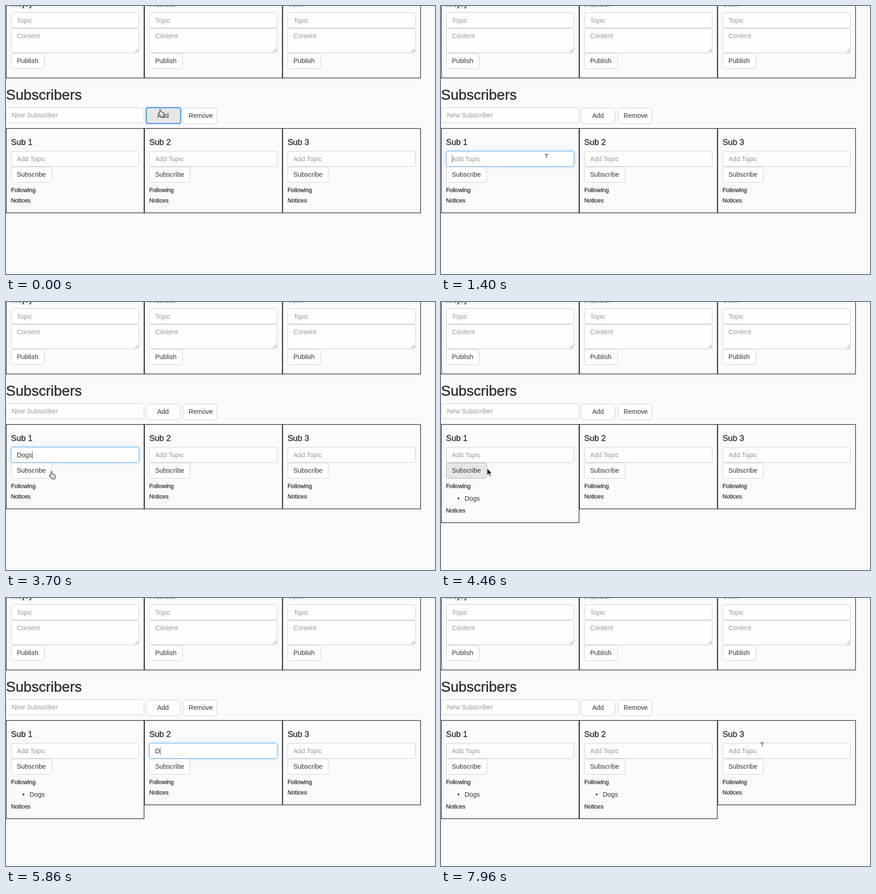
These frames come from a looping animation (947 px wide and 592 px high, 8000 ms). An HTML page:

```html
<!DOCTYPE html>
<html lang="en">
<head>
<meta charset="utf-8">
<title>Publishers and subscribers</title>
<style>
  html, body { margin: 0; width: 100%; height: 100%; overflow: hidden; background: #fafafc; }
  svg { display: block; font: 14.4px "Liberation Sans", Arial, sans-serif; }
  text { fill: #333; white-space: pre; }
  .hint { fill: #999; }
  .h2 { font-size: 31.7px; stroke: #333; stroke-width: .6px; }
  .h4 { font-size: 18.3px; stroke: #333; stroke-width: .45px; }
  .h6 { font-size: 12.8px; stroke: #333; stroke-width: .35px; }
  .box { fill: #fefefd; stroke: #ccc; }
  .focus { stroke: #66afe9; filter: drop-shadow(0 0 3px rgba(102, 175, 233, .6)); }
  .down { fill: #e6e6e6; stroke: #adadad; }
  .ring { fill: #e6e6e6; stroke: #69a5e8; stroke-width: 3px; }
  .panel { fill: none; stroke: #111; stroke-width: 1.2px; }
</style>
</head>
<body>
<svg id="stage" width="947" height="592" viewBox="0 0 947 592">
  <g id="page"></g><g id="live"></g><g id="mouse"></g>
</svg>
<script>
const LOOP = 8000, COL = 305.2;
const $ = id => document.getElementById(id);
const pen = document.createElement('canvas').getContext('2d');
pen.font = '14.4px "Liberation Sans", Arial, sans-serif';

const text = (x, y, s, cls = '') => `<text x="${x}" y="${y}" class="${cls}">${s}</text>`;
const box = (x, y, w, h, cls = 'box', r = 4) =>
  `<rect x="${x + .5}" y="${y + .5}" width="${w - 1}" height="${h - 1}" rx="${r}" class="${cls}"/>`;
const button = (x, y, w, s, cls = '') => box(x, y, w, 35, 'box ' + cls) + text(x + 13, y + 22.2, s);
const panel = (x, y, h) => box(x, y, COL, h, 'panel', 0);

// Subscriber scripts: focus, key presses, click on the button, list shown, button released
const subs = [
  { focus: 1250, keys: [1980, 2160, 2320, 2700], press: 4080, done: 4200, release: 5420 },
  { focus: 5420, keys: [5820, 6030, 6220, 6440], press: 7480, done: 7560, release: 7760 },
  null
];
const hidden = [[1980, 2760], [5810, 6640]];

// Pointer hot spot: time, x, y
const path = [
  [0, 340, 228], [300, 340, 228], [700, 296, 276], [1100, 236, 328], [1400, 233, 331],
  [2760, 233, 331], [3420, 126, 366], [3700, 100, 374], [4080, 92, 375], [4280, 97, 372],
  [4440, 101.8, 367.5], [4500, 101.8, 367.5], [4960, 262, 356], [5100, 262, 356],
  [5400, 430, 338], [6640, 430, 338], [7000, 391, 355.5], [7180, 384, 370],
  [7560, 384, 370], [7950, 709, 323], [LOOP, 709, 323]
];

const hand = `<g fill="#fff" stroke="#333" stroke-width="1.2" stroke-linejoin="round">
  <path d="M4 9V2q0-1.5 1.4-1.5T6.8 2v4.3q2.4-1 2.8.8q2-.7 2.4.8q2-.5 2.2 1.4v2.8q-.2 2-1.6 4v1H6.4v-1L1.4 10.8q-1.2-1.8.4-2.4Q3 8.4 4 10Z"/>
  <path d="M7.2 11v3M9.3 11v3M11.4 11v3" stroke-width=".8"/></g>`;
const arrow = '<path d="M0 0V15L3.5 11.8L6 17.6L8.6 16.5L6.1 10.8H10.8Z" fill="#222" stroke="#fff" stroke-width=".9"/>';
const beam = '<path d="M-4-3.5Q-1-3.5 0-2.5Q1-3.5 4-3.5M0-3V4.5" fill="none" stroke="#555" stroke-width="1.7"/>';

function drawPage() {
  let s = text(0, 207, 'Subscribers', 'h2') + box(0, 224, COL, 35) +
    text(13, 246, 'New Subscriber', 'hint') + button(390, 225, 76, 'Remove');
  ['Mojey', 'Rundel', 'Vilm'].forEach((name, i) => {
    const x = COL * i;
    s += panel(x, -60, 219.5) + text(x + 11, .6, name, 'h4') +
      box(x + 11, 14, 283, 35) + text(x + 24, 36.5, 'Topic', 'hint') +
      box(x + 11, 49, 283, 55) + text(x + 24, 71.2, 'Content', 'hint') +
      `<path d="M${x + 284.5} 102l7.5-7.5m-3.5 7.5l3.5-3.5" stroke="#777"/>` +
      button(x + 11, 104, 74, 'Publish') + text(x + 11, 307, 'Sub ' + (i + 1), 'h4');
  });
  $('page').innerHTML = s;
}

function drawSub(i, t) {
  const x = COL * i, a = subs[i];
  const on = a && t >= a.focus && t < a.press;
  const listed = a && t >= a.done;
  const down = a && t >= a.press && t < a.release;
  const typed = a && t < a.done ? 'Dogs'.slice(0, a.keys.filter(k => t >= k).length) : '';
  const shift = listed ? 30.5 : 0;
  let s = panel(x, 270, 187.5 + shift) + box(x + 11, 320.5, 283, 34.5, on ? 'box focus' : 'box') +
    text(x + 24, 343, typed || 'Add Topic', typed ? '' : 'hint') +
    button(x + 11, 355, 90.5, 'Subscribe', down ? 'down' : '') +
    text(x + 11, 411, 'Following', 'h6') + text(x + 11, 434.3 + shift, 'Notices', 'h6');
  if (on) s += `<rect x="${x + 24.3 + pen.measureText(typed).width}" y="330" width="1" height="16" fill="#444"/>`;
  if (listed) s += `<circle cx="${x + 38.5}" cy="434" r="2" fill="#333"/>` + text(x + 52, 438.5, 'Dogs');
  return s;
}

function pointer(t) {
  if (hidden.some(([a, b]) => t >= a && t < b)) return '';
  const n = path.findIndex(p => p[0] > t), [t0, x0, y0] = path[n - 1], [t1, x1, y1] = path[n];
  const u = (t - t0) / (t1 - t0), e = u * u * (3 - 2 * u);
  const x = x0 + (x1 - x0) * e, y = y0 + (y1 - y0) * e, cx = x % COL;
  const inside = (px, l, r, top, bottom) => px >= l && px <= r && y >= top && y <= bottom;
  const overButton = inside(cx, 11, 101.5, 355, 390) || inside(x, 309, 385, 225, 260);
  const overField = inside(cx, 11, 294, 320, 355) || inside(x, 0, 305, 224, 259);
  const shape = overButton ? `<g transform="translate(-5 0)">${hand}</g>` : overField ? beam : arrow;
  return `<g transform="translate(${x} ${y})">${shape}</g>`;
}

function frame(now) {
  const t = now % LOOP;
  const add = t < 1250
    ? box(309, 224, 77, 36, 'ring', 3) + text(333.7, 247.2, 'Add')
    : box(309, 225, 76, 35) + text(333.7, 247.2, 'Add');
  $('live').innerHTML = add + subs.map((_, i) => drawSub(i, t)).join('');
  $('mouse').innerHTML = pointer(t);
  requestAnimationFrame(frame);
}

drawPage();
requestAnimationFrame(frame);
</script>
</body>
</html>
```
